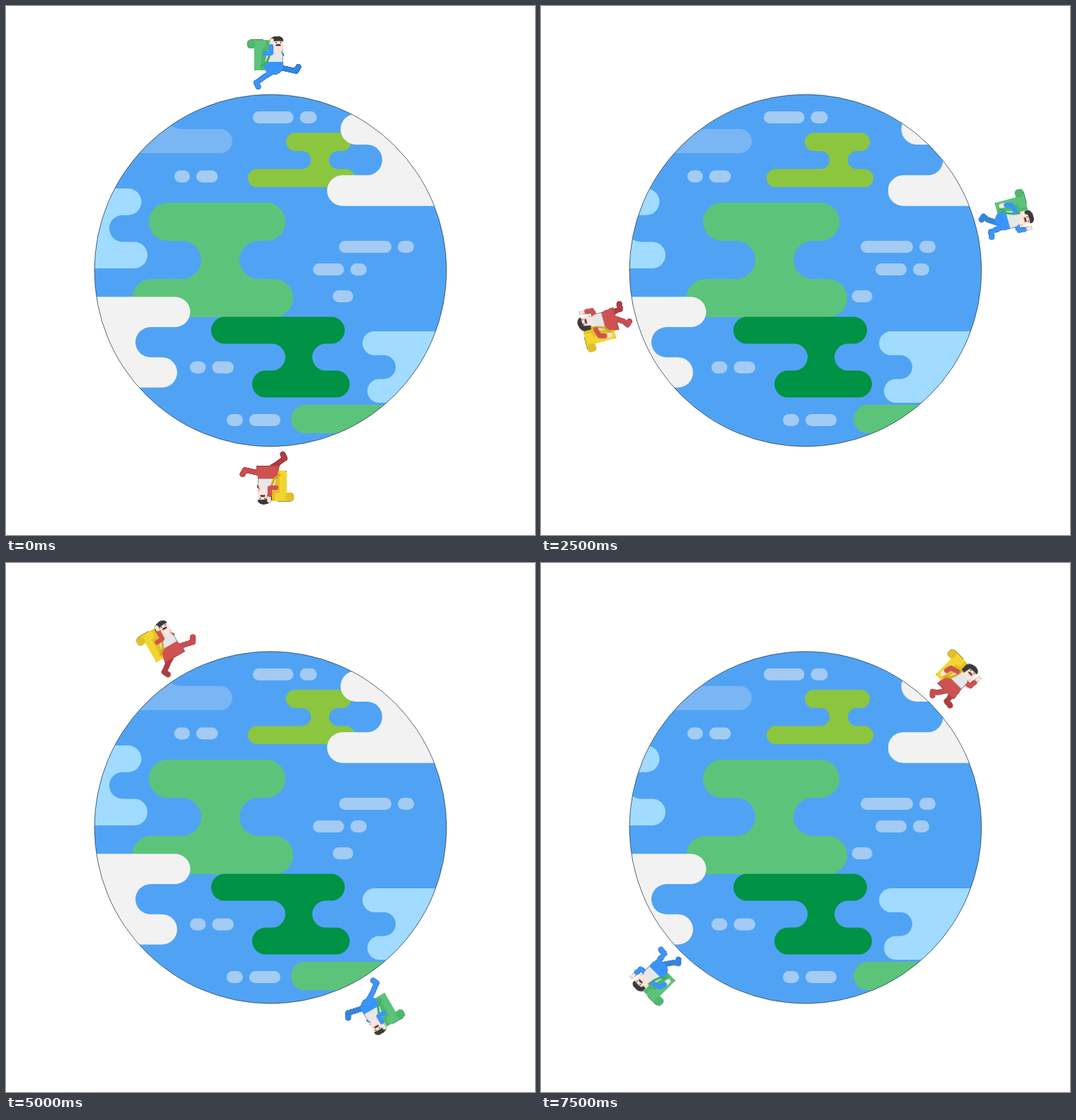
Recreate the animation shown at these times as an HTML page. Size 748 by 748 pixels, loop 8000 ms.

```html
<!DOCTYPE html>
<html lang="en">
<head>
<meta charset="utf-8">
<title>Around the planet</title>
<style>
html, body { margin: 0; width: 100%; height: 100%; overflow: hidden; background: #fff; }
svg { display: block; width: 100vw; height: 100vh; }
.drift { animation: drift 1s step-end infinite; }
.orbit { transform-origin: 374px 374px; animation: orbit 8s steps(16) infinite; }
.runner { filter: drop-shadow(0 0 .5px #222) drop-shadow(0 0 .3px #222); }
.stride { animation: show 1s step-end infinite; }
.step { animation: show 1s -.5s step-end infinite; }
polyline { fill: none; stroke-linejoin: round; stroke-linecap: round; }
@keyframes drift { 50%, 100% { transform: translateX(var(--dx)); } }
@keyframes orbit { to { transform: rotate(240deg); } }
@keyframes show { 0% { visibility: visible; } 50%, 100% { visibility: hidden; } }
</style>
</head>
<body>
<svg id="stage" viewBox="0 0 748 748" xmlns="http://www.w3.org/2000/svg"></svg>
<script>
const OCEAN = "#50a3f4", ICE = "#f2f2f2", SHALLOW = "#a1dbff", MEADOW = "#5cc47a";
const SKIN = "#fbe6dc", HAIR = "#3a3a3a", SHIRT = "#e6e7e9";

const path = (d, fill) => `<path d="${d}" fill="${fill}"/>`;
const dot = (x, y, r, fill) => `<circle cx="${x}" cy="${y}" r="${r}" fill="${fill}"/>`;
const rect = (x, y, w, h, rx, fill) =>
  `<rect x="${x}" y="${y}" width="${w}" height="${h}" rx="${rx}" fill="${fill}"/>`;
const drift = (dx, body) => `<g class="drift" style="--dx:${dx}px">${body}</g>`;

// Three stacked half circles of one height: out, in, out. dir 1 faces right, -1 left.
// The path runs downwards on the right, upwards on the left.
function edge(dir, tips, y, row) {
  const r = row / 2;
  return tips.map((tip, i) => {
    const bulge = i % 2 ? -dir : dir;
    const x = tip - bulge * r;
    const sweep = i % 2 ? 0 : 1;
    return `L${x} ${y + dir * i * row}a${r} ${r} 0 0 ${sweep} 0 ${dir * row}`;
  }).join("");
}

// Land that reaches past the rim; tips run from top to bottom.
function coast(dx, dir, tips, y, row, fill) {
  const far = 374 - dir * 320, bottom = y + 3 * row;
  const side = dir > 0 ? edge(1, tips, y, row) : edge(-1, [...tips].reverse(), bottom, row);
  const [start, end] = dir > 0 ? [y, bottom] : [bottom, y];
  return drift(dx, path(`M${far} ${start}${side}L${far} ${end}Z`, fill));
}

// Two bars joined by a waist as wide as one bar is high.
function island(dx, waist, y, row, top, base, fill) {
  const right = edge(1, [top[1], waist + row / 2, base[1]], y, row);
  const left = edge(-1, [base[0], waist - row / 2, top[0]], y + 3 * row, row);
  return drift(dx, path(`M${waist} ${y}${right}${left}Z`, fill));
}

// A row of short dashes, one gap apart.
function cloud(dx, x, y, ...widths) {
  let dashes = "";
  for (const w of widths) {
    dashes += rect(x, y, w, 17, 8.5, "#a3cbf3");
    x += w + 9;
  }
  return drift(dx, dashes);
}

const planet =
  dot(374, 374, 249, OCEAN) +
  drift(-22, path("M100 174L222 160Q234 174 250 174H303A17 17 0 0 1 303 208H100Z", "#7ab5f4")) +
  island(-23, 444, 179.3, 25.6, [396, 488], [342, 493], "#8cc63f") +
  coast(36.5, -1, [473, 532, 454], 152.5, 43.4, ICE) +
  coast(-24, 1, [191.5, 146, 200], 258, 37.7, SHALLOW) +
  island(27, 303, 278, 54, [202, 395], [178.5, 406], MEADOW) +
  coast(-27, 1, [260.5, 183, 242], 411.3, 42.7, ICE) +
  island(-18, 414, 439.6, 38, [290, 479], [348, 486], "#009245") +
  coast(-26, -1, [504, 551, 511], 460, 33.7, SHALLOW) +
  drift(39, rect(403, 564, 300, 40, 20, MEADOW)) +
  cloud(-34, 349, 149, 57.5, 24) +
  cloud(-31, 238, 232.5, 22, 30.5) +
  cloud(-19, 471, 332, 74, 23) +
  cloud(39, 434, 364, 44, 23) +
  cloud(-22.5, 462, 402, 29) +
  cloud(-19, 260, 502.5, 22.5, 30.5) +
  cloud(30, 312, 577, 23, 44);

// Runners are drawn upright around the belt, 294 above the planet's centre.
const limb = (color, w, points) => `<polyline points="${points}" stroke="${color}" stroke-width="${w}"/>`;
const leg = (color, joints, foot) => limb(color, 7, joints) + limb(color, 7.5, foot);

const pack = c =>
  rect(-23, -32, 24, 43, 2.5, c.pack) + rect(-13, -31, 13, 41, 0, c.shade) +
  rect(-33, -32.5, 27, 12.5, 6, c.pack) + dot(-27, -26, 6.1, c.shade);

const body = c =>
  path("M-4 -17H14Q18 -12 17.5 1H-8Z", SHIRT) + path(c.hips, c.cloth) +
  rect(-1.5, -35, 19.5, 20, 5, SKIN) + path(c.hair, HAIR) +
  path("M7.5 -25.5Q11 -27 14.5 -25.5V-23.5H7.5Z", "#5a2a2a") +
  dot(8, -28.3, .9, HAIR) + dot(14.5, -28.3, .9, HAIR) +
  limb(c.strap, 3.2, "0,-19 -1.5,-10 -5,-1 -13,5");

const stride = c =>
  leg(c.legs[0], "13,7 25,9.5 36,12", "36,12 39.5,6") +
  leg(c.legs[1], "3,13 -8,19.5 -20,28.5", "-20,28.5 -17.5,34") +
  pack(c) + limb(c.cloth, 4, "14,-14 17,-11") + body(c) +
  limb(SKIN, 5.5, "2,-27 2,-31.5") + limb(c.cloth, 6.5, "-8,-13 1,-13.5 1,-23");

const step = c =>
  leg(c.legs[0], "5,15 -3,27 -8.5,31", "-8.5,31 -5,35") +
  leg(c.legs[1], "13,10 15,26.5", "15,26.5 22.5,27.5") +
  limb(SKIN, 5, "24,-20 24.5,-28.5") + limb(c.cloth, 6.5, "13,-10 23.5,-12.5 24,-20") +
  pack(c) + body(c) +
  limb(SKIN, 6.5, "-16.5,-2 -16.5,3") + limb(c.cloth, 7, "-4,-14 -14,-11 -16,-4");

const runner = (turn, c) =>
  `<g class="runner" transform="rotate(${turn} 374 374) translate(374 80)">` +
  `<g class="stride">${stride(c)}</g><g class="step">${step(c)}</g></g>`;

const blue = {
  cloth: "#3a94fd", pack: MEADOW, shade: "#4db86c", strap: "#3fae62",
  legs: ["#2f86e4", "#3a94fd"],
  hips: "M-8.5 -1H17.5Q20 11 10 16Q0 19 -6 12Q-10 6 -8.5 -1Z",
  hair: "M-1 -27V-32Q2 -37 10 -37Q18 -37 18 -30Q11 -31 5 -30L3 -26Z"
};
const red = {
  cloth: "#d05151", pack: "#f4d52f", shade: "#e2c028", strap: "#d6a91c",
  legs: ["#cc4c4d", "#b23b40"],
  hips: "M-9 -.5H17.5L20 17.5H-12.5Z",
  hair: "M-2 -20V-30Q1 -36.5 10 -36.5Q18 -36 18 -30Q11 -31 5.5 -29L3.5 -19Z"
};

document.getElementById("stage").innerHTML =
  `<clipPath id="disc"><circle cx="374" cy="374" r="249"/></clipPath>` +
  `<g clip-path="url(#disc)">${planet}</g>` +
  `<circle cx="374" cy="374" r="248.9" fill="none" stroke="#222f3d" stroke-width=".7"/>` +
  `<g class="orbit">${runner(0, blue)}${runner(180, red)}</g>`;
</script>
</body>
</html>
```
